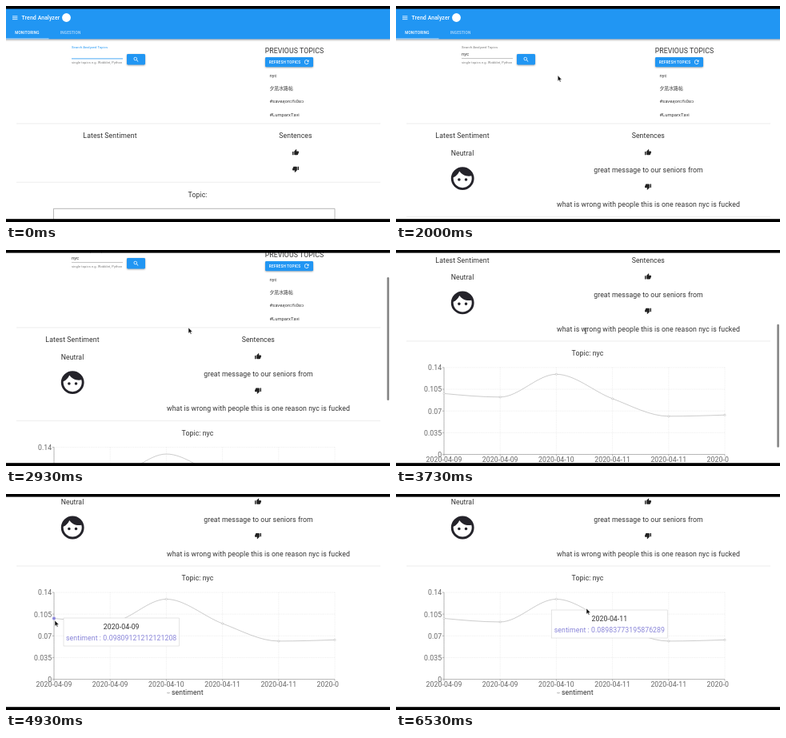
Recreate the animation shown at these times as an HTML page. Size 480 by 270 pixels, loop 6.67 s.

```html
<!DOCTYPE html>
<html lang="en">
<head>
<meta charset="utf-8">
<title>Trend Analyzer</title>
<style>
html, body { margin: 0; width: 100%; height: 100%; overflow: hidden; background: #fff; }
svg { display: block; width: 100vw; height: 100vh; }
text { font-family: Roboto, "Noto Sans CJK JP", "Noto Sans Thai", "Noto Sans", sans-serif; white-space: pre; }
</style>
</head>
<body>
<svg id="stage" viewBox="0 0 480 270"></svg>
<script>
const LOOP = 6670, LAST = 6530;
const BLUE = '#2196f3', INK = '#333', GREY = '#777', PURPLE = '#8884d8';
const BIG = 8.72;
const $ = id => document.getElementById(id);

const ICON = {
  search: 'M15.5 14h-.79l-.28-.27C15.41 12.59 16 11.11 16 9.5 16 5.91 13.09 3 9.5 3S3 5.91 3 9.5 5.91 16 9.5 16c1.61 0 3.09-.59 4.23-1.57l.27.28v.79l5 4.99L20.49 19l-4.99-5zm-6 0C7.01 14 5 11.99 5 9.5S7.01 5 9.5 5 14 7.01 14 9.5 11.99 14 9.5 14z',
  refresh: 'M17.65 6.35C16.2 4.9 14.21 4 12 4c-4.42 0-7.99 3.58-7.99 8s3.57 8 7.99 8c3.73 0 6.84-2.55 7.73-6h-2.08c-.82 2.33-3.04 4-5.65 4-3.31 0-6-2.69-6-6s2.69-6 6-6c1.66 0 3.14.69 4.22 1.78L13 11h7V4l-2.35 2.35z',
  thumb: 'M1 21h4V9H1v12zm22-11c0-1.1-.9-2-2-2h-6.31l.95-4.57.03-.32c0-.41-.17-.79-.44-1.06L14.17 1 7.59 7.59C7.22 7.95 7 8.45 7 9v10c0 1.1.9 2 2 2h9c.83 0 1.54-.5 1.84-1.22l3.02-7.05c.09-.23.14-.47.14-.73v-2z',
  face: 'M12 2a10 10 0 1 0 0 20a10 10 0 1 0 0-20zm0 18c-4.41 0-8-3.59-8-8 0-.29.02-.58.05-.86 2.36-1.05 4.23-2.98 5.21-5.37C11.07 8.33 14.05 10 17.42 10c.78 0 1.53-.09 2.25-.26.21.71.33 1.47.33 2.26 0 4.41-3.59 8-8 8zM7.75 13a1.25 1.25 0 1 0 2.5 0a1.25 1.25 0 1 0-2.5 0zM13.75 13a1.25 1.25 0 1 0 2.5 0a1.25 1.25 0 1 0-2.5 0z'
};

// text placed by its vertical middle
function text(x, y, str, { size = BIG, fill = INK, anchor = 'start', weight = 400, gap = .0094, id = '' } = {}) {
  return `<text ${id && `id="${id}"`} x="${x}" y="${y + size * .355}" font-size="${size}" fill="${fill}" text-anchor="${anchor}" font-weight="${weight}" letter-spacing="${size * gap}">${str}</text>`;
}
const mid = (x, y, str, o = {}) => text(x, y, str, { anchor: 'middle', ...o });
const rect = (x, y, w, h, fill, more = '') => `<rect x="${x}" y="${y}" width="${w}" height="${h}" fill="${fill}" ${more}/>`;
const line = (x1, y1, x2, y2, stroke, w, more = '') => `<path d="M${x1} ${y1}L${x2} ${y2}" stroke="${stroke}" stroke-width="${w}" fill="none" ${more}/>`;
const icon = (name, x, y, size, fill, turn = 0) =>
  `<path d="${ICON[name]}" fill="${fill}" transform="translate(${x} ${y}) rotate(${turn}) scale(${size / 24}) translate(-12 -12)"/>`;
const divider = y => line(13, y, 468, y, '#e9e9e9', .8);

// chart geometry, in page coordinates
const X0 = 60, STEP = 70.2, TOP = 296.6, BASE = 405.2, RIGHT = X0 + 5 * STEP;
const days = ['09', '09', '10', '11', '11', '11'].map(d => '2020-04-' + d);
const values = ['0.09809121212121208', '0.09237518240740741', '0.12913046271186443', '0.08983773195876289', '0.0615', '0.0635'];
const points = values.map((v, i) => [X0 + i * STEP, BASE - v / .14 * (BASE - TOP)]);

function monotone(p) {
  const n = p.length, s = [], m = [];
  for (let i = 0; i < n - 1; i++) s.push((p[i + 1][1] - p[i][1]) / STEP);
  for (let i = 1; i < n - 1; i++) {
    const a = s[i - 1], b = s[i];
    m[i] = a * b <= 0 ? 0 : Math.sign(a) * Math.min(Math.abs(a), Math.abs(b), Math.abs(a + b) / 4) * 2;
  }
  m[0] = (3 * s[0] - m[1]) / 2;
  m[n - 1] = (3 * s[n - 2] - m[n - 2]) / 2;
  let d = 'M' + p[0];
  const k = STEP / 3;
  for (let i = 0; i < n - 1; i++) {
    const [x, y] = p[i], [u, v] = p[i + 1];
    d += `C${x + k},${y + m[i] * k} ${u - k},${v - m[i + 1] * k} ${u},${v}`;
  }
  return d;
}

function chartData() {
  const rows = [.14, .105, .07, .035, 0].map((v, i) => [v, TOP + i * (BASE - TOP) / 4]);
  const dash = 'stroke-dasharray="1.1 1.1"';
  return rows.map(([v, y]) =>
      line(X0, y, RIGHT, y, '#ddd', .5, dash) + line(X0 - 2.2, y, X0, y, '#777', .5) +
      text(57.3, y + .3, v, { anchor: 'end', fill: '#666' })).join('') +
    points.map(([x], i) =>
      line(x, TOP, x, BASE, '#ddd', .5, dash) + line(x, BASE, x, BASE + 2.2, '#777', .5) +
      `<g clip-path="url(#right)">${mid(x, 411.4, days[i], { fill: '#666' })}</g>`).join('') +
    line(X0, BASE, RIGHT, BASE, '#777', .5) + line(X0, TOP, X0, BASE, '#777', .5) +
    `<path id="curve" d="${monotone(points)}" pathLength="1" stroke="#aaa" stroke-width=".6" fill="none"/>` +
    `<g id="dots">${points.map(([x, y]) => `<circle cx="${x}" cy="${y}" r="1.1" fill="#fff" stroke="#aaa" stroke-width=".45"/>`).join('')}</g>` +
    line(201, 422.2, 205, 422.2, '#999', .5) + `<circle cx="203" cy="422.2" r=".8" fill="#fff" stroke="#999" stroke-width=".4"/>` +
    text(207, 421.8, 'sentiment') +
    `<circle id="active" r="2.2" fill="${PURPLE}" stroke="#fff" stroke-width=".4"/>`;
}

const topics = ['nyc', '夕凪水路帖', '#saveลุงกะทิเขียว', '#LumparxTavi'];

$('stage').innerHTML = `
<defs>
  <clipPath id="right"><rect x="0" y="290" width="416" height="140"/></clipPath>
  <clipPath id="btn"><rect x="151" y="60" width="23" height="13.5" rx="1.4"/></clipPath>
  <filter id="soft" x="-20%" y="-40%" width="140%" height="200%"><feGaussianBlur stdDeviation=".9"/></filter>
</defs>
${rect(0, 0, 480, 270, '#fff')}
<g id="page">
  ${rect(-4, 30, 488, 12.5, '#000', 'opacity=".35" filter="url(#soft)"')}
  ${rect(0, 0, 480, 41.3, BLUE)}
  ${[12.8, 14.7, 16.6].map(y => line(8, y, 14.4, y, '#fff', .8)).join('')}
  ${text(19.5, 14.8, 'Trend Analyzer', { size: 7, fill: '#fff', weight: 500 })}
  <circle cx="75.5" cy="14.5" r="5.4" fill="#fff"/>
  ${mid(26.4, 33.4, 'MONITORING', { size: 4.75, fill: '#fff', weight: 500, gap: .0286 })}
  ${mid(80.6, 33.4, 'INGESTION', { size: 4.75, fill: '#b5dafa', weight: 500, gap: .0286 })}
  ${rect(0, 40.5, 53.5, .8, '#d8ecfd')}

  ${text(82, 52, 'Search Analyzed Topics', { size: 4.2, id: 'label' })}
  ${text(82, 60.4, '', { size: 5.8, id: 'typed' })}
  ${rect(82, 57.4, .5, 6.4, INK, 'id="caret"')}
  ${rect(82, 65.5, 64, .8, BLUE, 'id="rule"')}
  ${text(82, 70.2, 'single topics e.g. Wobblet, Python', { size: 4.05, fill: GREY, gap: .02 })}
  ${rect(151, 60.8, 23, 13.5, '#000', 'rx="1.4" opacity=".35" filter="url(#soft)"')}
  ${rect(151, 60, 23, 13.5, BLUE, 'rx="1.4" id="search"')}
  <g clip-path="url(#btn)"><circle id="ripple" cx="155" cy="69" fill="#fff"/></g>
  ${icon('search', 162.6, 66.8, 8, '#fff')}

  ${text(323.7, 56.3, 'PREVIOUS TOPICS')}
  ${rect(324, 64.9, 60, 12.2, '#000', 'rx="1.4" opacity=".35" filter="url(#soft)"')}
  ${rect(324, 64, 60, 12.3, BLUE, 'rx="1.4"')}
  ${text(328.8, 70.2, 'REFRESH TOPICS', { size: 4.75, fill: '#fff', weight: 500, gap: .0286 })}
  ${icon('refresh', 375.7, 70.1, 8.4, '#fff')}
  ${topics.map((s, i) => text(329.5, 87 + i * 16.2, s, { size: 5.8 })).join('')}
  ${divider(147)}

  <g id="before">
    ${mid(130, 162.2, 'Latest Sentiment')}
    ${mid(362, 162.2, 'Sentences')}
    ${icon('thumb', 362, 183, 8.7, '#222')}
    ${icon('thumb', 362, 204, 8.7, '#222', 180)}
    ${divider(220.3)}
    ${mid(239.5, 236.3, 'Topic:')}
    <path d="M59.5 270V253.3H411V270" fill="none" stroke="#999" stroke-width=".7"/>
  </g>
  <g id="after">
    ${mid(83, 162.2, 'Latest Sentiment')}
    ${mid(83, 183.6, 'Neutral')}
    ${icon('face', 83.2, 215.6, 34.6, '#24232a')}
    ${mid(315.3, 162.2, 'Sentences')}
    ${icon('thumb', 315, 183, 8.7, '#222')}
    ${mid(315.5, 205.2, 'great message to our seniors from')}
    ${icon('thumb', 315, 225.8, 8.7, '#222', 180)}
    ${mid(315.5, 248.2, 'what is wrong with people this is one reason nyc is fucked')}
    ${divider(263.6)}
    ${mid(239.5, 279, 'Topic: nyc')}
    ${chartData()}
  </g>
</g>
<g id="tip">
  ${rect(0, 0, 144.5, 35, '#fff', 'stroke="#ccc" stroke-width=".5"')}
  ${mid(72.2, 10.6, '', { id: 'tipDay' })}
  ${mid(72.2, 24.6, '', { fill: PURPLE, id: 'tipValue' })}
</g>
<rect id="bar" x="476.3" width="2.6" height="154" rx="1.3" fill="#858585"/>
<path id="arrow" d="M0 0V7.2L1.7 5.7L2.8 8.2L4 7.7L2.9 5.3H5.1Z" fill="#111" stroke="#fff" stroke-width=".5"/>
<path id="beam" d="M-1.4 -3.6Q0 -3.6 0 -2.6Q0 -3.6 1.4 -3.6M0 -2.6V2.6M-1.4 3.6Q0 3.6 0 2.6Q0 3.6 1.4 3.6M-.8 1.2H.8" fill="none" stroke="#333" stroke-width=".7"/>
<path id="hand" d="M-.3 0Q.6 -.7 1.1 .2V2.6L4.4 3.3Q5.2 3.7 5 4.8L4.4 7.8H.6L-1.8 4.6Q-1.6 3.6 -.4 4.4Z" fill="#fff" stroke="#111" stroke-width=".7"/>
${rect(0, 0, 480, 3.6, '#000')}
${rect(0, 266.2, 480, 3.8, '#000')}`;

// keys: [time, ...numbers], linear between
function at(keys, t) {
  if (t <= keys[0][0]) return keys[0].slice(1);
  for (let i = 1; i < keys.length; i++) {
    const a = keys[i - 1], b = keys[i];
    if (t < b[0]) {
      const u = (t - a[0]) / (b[0] - a[0]);
      return a.slice(1).map((v, j) => v + (b[j + 1] - v) * u);
    }
  }
  return keys[keys.length - 1].slice(1);
}
const scrollKeys = [[2200, 0], [2270, 25], [2330, 25], [2530, 32], [2740, 33], [2930, 50], [3050, 50],
  [3400, 54], [3730, 149.7], [3800, 149.7], [4130, 167], [4530, 173.6]];
const mouseKeys = [[1200, 154, 67.5], [1760, 154, 67.5], [2130, 228, 97], [3400, 228, 97], [3600, 237, 101],
  [4200, 237, 101], [4530, 150, 125], [4930, 61, 158], [5000, 61, 158], [5330, 62, 161], [5600, 85, 182],
  [5750, 100, 187], [6000, 145, 186], [6130, 168, 180], [6270, 200, 160], [6400, 226, 127], [6530, 238, 143]];
const tipKeys = [[4600, 134, 125], [4800, 122, 137], [4930, 72, 155], [5000, 72, 155], [5130, 64, 163], [5400, 64, 165],
  [5750, 64, 190], [6050, 133, 191], [6130, 151, 189], [6270, 181, 172], [6400, 202, 150], [6530, 194.7, 145]];

const show = (id, on) => $(id).style.display = on ? '' : 'none';
const put = (id, x, y) => $(id).setAttribute('transform', `translate(${x} ${y})`);
const set = (id, name, v) => $(id).setAttribute(name, v);

function draw(t) {
  const [scroll] = at(scrollKeys, t), done = t >= 1870;
  put('page', 0, -scroll);
  show('before', !done);
  show('after', done);

  const focus = t < 1470;
  set('label', 'fill', focus ? BLUE : GREY);
  set('rule', 'fill', focus ? BLUE : '#8a8a8a');
  set('rule', 'height', focus ? .8 : .5);
  $('typed').textContent = t < 270 ? '' : t < 530 ? 'n' : 'nyc';
  show('caret', (t >= 130 && t < 270) || (t >= 530 && t < 930));
  set('caret', 'x', t < 270 ? 82 : 91);
  set('search', 'fill', t >= 1270 && t < 1930 ? '#1e88e5' : BLUE);
  const r = (t - 1470) / 400;
  show('ripple', r >= 0 && r < 1);
  set('ripple', 'r', Math.max(0, r) * 22);
  set('ripple', 'opacity', .3 * (1 - r));

  const grow = Math.min(1, Math.max(0, (t - 1870) / 1500));
  const drawn = 1 - (1 - grow) ** 2;
  set('curve', 'stroke-dasharray', grow < 1 ? `${drawn} 2` : 'none');
  show('dots', grow === 1);

  const [x, y] = at(mouseKeys, t), hover = t >= 4600;
  const k = Math.max(0, Math.min(5, Math.round((x - X0) / STEP)));
  show('active', hover);
  show('tip', hover);
  if (hover) {
    set('active', 'cx', points[k][0]);
    set('active', 'cy', points[k][1]);
    put('tip', ...at(tipKeys, t));
    $('tipDay').textContent = days[k];
    $('tipValue').textContent = 'sentiment : ' + values[k];
  }

  const overButton = t >= 1200 && t < 1830, overText = t >= 3550 && t < 4230;
  show('hand', overButton);
  show('beam', overText);
  show('arrow', t >= 1830 && !overText);
  for (const id of ['hand', 'beam', 'arrow']) put(id, x, y);

  set('bar', 'y', 4.5 + .59 * scroll);
  set('bar', 'opacity', t < 2200 ? 0 : Math.max(0, Math.min(1, (4880 - t) / 250)));
}

const start = performance.now();
function tick() {
  draw(Math.min((performance.now() - start) % LOOP, LAST));
  requestAnimationFrame(tick);
}
draw(0);
requestAnimationFrame(tick);
</script>
</body>
</html>
```
